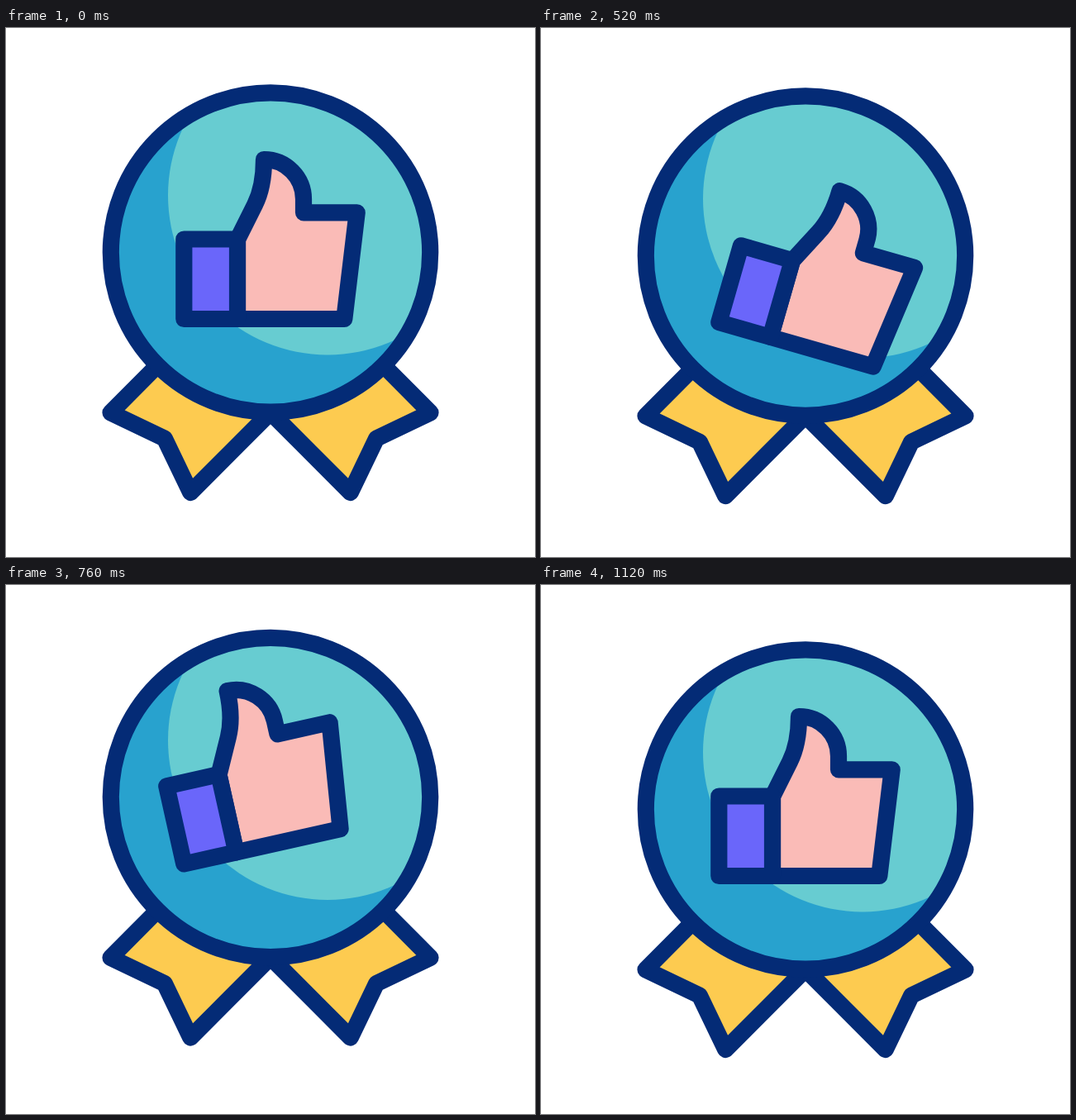
Write an HTML page that moves like this. It is 640 by 640 pixels and loops after 1.48 s.

```html
<!DOCTYPE html>
<html lang="en">
<head>
<meta charset="utf-8">
<title>Thumbs-up badge</title>
<style>
  html, body { margin: 0; width: 100%; height: 100%; overflow: hidden; background: #fff; }
  svg { display: block; width: 100%; height: 100%; }
  .line { stroke: #042b76; stroke-width: 20.2; stroke-linejoin: round; stroke-linecap: round; }
</style>
</head>
<body>
<svg viewBox="0 0 640 640">
  <defs>
    <clipPath id="disc"><circle cx="320" cy="271.5" r="193"/></clipPath>
  </defs>
  <g id="badge">
    <path id="leftRibbon" class="line" fill="#fdcb50"/>
    <path id="rightRibbon" class="line" fill="#fdcb50" transform="matrix(-1 0 0 1 640 0)"/>
    <circle cx="320" cy="271.5" r="193" fill="#28a2ce"/>
    <circle cx="389" cy="202.5" r="193" fill="#67ccd1" clip-path="url(#disc)"/>
    <circle class="line" cx="320" cy="271.5" r="193.2" fill="none"/>
    <g id="hand">
      <path class="line" fill="#fabbb7" d="M280 256 L301 214 C309 198 312 179 312 159
        C339 159 360 181 360 207 V223.3 H424.7 L409.3 352 H280 Z"/>
      <path class="line" fill="#6a66fa" d="M215.3 255.5 H280 V352 H215.3 Z"/>
    </g>
  </g>
</svg>
<script>
const LOOP = 1480, STEP = 40;
const byId = id => document.getElementById(id);
const ease = p => p * p * (3 - 2 * p);

// Eased value at time t through [time, value] keys, held at both ends.
function track(t, ...keys) {
  const next = keys.findIndex(([time]) => t < time);
  if (next === 0) return keys[0][1];
  if (next < 0) return keys[keys.length - 1][1];
  const [t0, a] = keys[next - 1], [t1, b] = keys[next];
  return a + (b - a) * ease((t - t0) / (t1 - t0));
}

// A ribbon tucks in, spreads out and settles.
const swing = (t, rest, tuck, spread) =>
  track(t, [80, rest], [280, rest + tuck], [440, rest + spread], [520, rest]);

// Both ribbons share one shape; side (-1 left, 1 right) tilts the spread.
function ribbon(t, side) {
  const outerX = swing(t, 126.5, 14, -13);
  const outerY = swing(t, 465.3, -14, 10.5 + 5.5 * side);
  const lowerX = swing(t, 223.2, 37, 2 + 11 * side);
  const lowerY = swing(t, 562, -26, 9);

  // The notch sits at a fixed depth behind the middle of the two tips.
  const dx = lowerX - outerX, dy = lowerY - outerY;
  const depth = 24 / Math.hypot(dx, dy);
  const notchX = (outerX + lowerX) / 2 + dy * depth;
  const notchY = (outerY + lowerY) / 2 - dx * depth;
  return `M190 401.5 L${outerX} ${outerY} ${notchX} ${notchY} ${lowerX} ${lowerY} 320 465 Z`;
}

function draw(time) {
  const t = Math.floor((time % LOOP) / STEP) * STEP;
  const lift = track(t, [80, 0], [440, 7.5], [760, -14.5], [1040, 0]);
  const tilt = track(t, [280, 0], [520, 16], [720, -16], [900, 11], [1120, 0]);
  byId("badge").setAttribute("transform", `translate(0 ${lift})`);
  byId("hand").setAttribute("transform", `rotate(${tilt} 215.3 352)`);
  byId("leftRibbon").setAttribute("d", ribbon(t, -1));
  byId("rightRibbon").setAttribute("d", ribbon(t, 1));
}

const start = performance.now();
function tick() {
  draw(performance.now() - start);
  requestAnimationFrame(tick);
}
tick();
</script>
</body>
</html>
```
